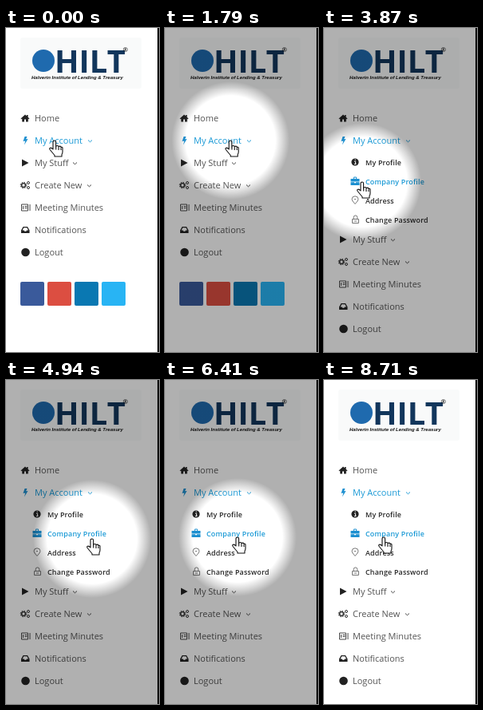
Animation of 192 by 406 pixels, one loop 9620 ms. Source, as an HTML page:

```html
<!DOCTYPE html>
<html lang="en">
<head>
<meta charset="utf-8">
<title>Account menu</title>
<style>
  html, body { margin: 0; width: 100%; height: 100%; overflow: hidden; background: #fff; }
  svg { display: block; width: 192px; height: 406px; }
  text { font-family: "Open Sans", sans-serif; fill: currentColor; }
  .item { font-size: 11px; color: #555; --ink: #222; }
  .sub { font-size: 9px; font-weight: 600; letter-spacing: .15px; color: #2a2a2a; --ink: #222; --edge: #777; }
  .active { color: #1b9ad6; --ink: #1b8fd0; --edge: #1b9ad6; }
  .brand { font-size: 40px; font-weight: 700; color: #12365c; }
  .tagline { font: italic bold 6.05px "Liberation Sans", Arial, sans-serif; color: #111; }
  .solid { fill: var(--ink); }
  .line { fill: none; stroke: var(--edge, #444); }
</style>
</head>
<body>
<svg viewBox="0 0 192 406">
  <defs>
    <radialGradient id="light" gradientUnits="userSpaceOnUse" cx="0" cy="0" r="74">
      <stop offset=".76" stop-opacity="0"/>
      <stop offset=".88" stop-opacity=".15"/>
      <stop offset="1" stop-opacity=".31"/>
    </radialGradient>
    <clipPath id="fold"><rect id="foldBox" y="156" width="190" height="0"/></clipPath>

    <path id="chevron" class="line" d="M-2.5-1L0 1.3 2.5-1"/>
    <path id="home" class="solid" d="M-5.5.5L0-4.5 2-2.8V-4h1.6v2.7L5.5.5l-.8.8-.9-.8v4H1v-3h-2v3h-2.8v-4l-.9.8z"/>
    <path id="bolt" class="solid" d="M-.5-5h3L1-1.7l2.500-.4L-1 5.500.2.500l-2.700.5z"/>
    <path id="play" class="solid" d="M-4-4.500L4.500 0-4 4.500z"/>
    <g id="gears" fill="none" stroke="#333">
      <circle cx="-2" r="2.500" stroke-width="1.700"/>
      <circle cx="-2" r="3.800" stroke-dasharray="1.5"/>
      <circle cx="4" cy="-3" r="1.500"/>
      <circle cx="4" cy="3" r="1.500"/>
    </g>
    <path id="paper" class="line" d="M-4.500-4h8v8h-8zM6-4v8M-2.500-2v4M-.5-1.500h3M-.5.5h3"/>
    <path id="tray" class="solid" d="M-2.500-4H3L5.500.5V4H-5V.5zM-1.700-2.700L-3.400.5h2l.7 1.200h2L2 .5h2L2.300-2.700z"/>
    <circle id="dot" cx=".5" r="5.300" class="solid"/>
    <g id="info">
      <circle r="4.600" class="solid"/>
      <path d="M-1-.7H.6v3M-1.200 2.500h2.700M-.4-2.800H.9" fill="none" stroke="#fff"/>
    </g>
    <path id="case" class="solid" d="M-5.500-3h3.500v-1.500q0-1 1-1h2q1 0 1 1V-3h3.500V.5h-11zM-1-4.500V-3h2v-1.500zM-5.500 1.200h4.500v1h2v-1h4.500V5h-11z"/>
    <path id="pin" class="line" d="M0 4.500Q-4 .5-4-1.500a4 3.700 0 0 1 8 0Q4 .5 0 4.500zM-1-1.500h2"/>
    <path id="lock" class="line" d="M-3.500-.5h8v5h-8zM-1.800-.5v-2.300a2.300 2.300 0 0 1 4.600 0v2.300M-1 2h3"/>
  </defs>

  <rect width="192" height="406" fill="#fff"/>
  <rect x="18" y="12" width="152" height="64" rx="3" fill="#f9fafa"/>
  <circle cx="47" cy="41" r="14" fill="#1f6aae"/>
  <text class="brand" x="61" y="56">HILT</text>
  <text x="146.5" y="30" font-size="8">®</text>
  <text class="tagline" x="32" y="64">Halverin Institute of Lending &amp; Treasury</text>

  <g id="upper"></g>
  <g id="submenu" clip-path="url(#fold)"></g>
  <g id="lower"></g>

  <rect id="shade" width="190" height="406" fill="url(#light)"/>
  <rect x="190" width="2" height="406" fill="#111"/>

  <g id="hand" fill="#fff" stroke="#111" stroke-width="1.1" stroke-linejoin="round">
    <path d="M-2 11V1.800a1.800 1.800 0 0 1 3.600 0V8q0-1.500 1.800-1.500T5 8.300q0-1.200 1.600-1.200T8 9q0-.8 1.100-.8T10 10v4q0 2-1 3.500V20H0V18.500Q-3 15-5.800 11.500q-1.200-1.800.3-2.300T-2 11Z"/>
    <path d="M1.700 8v3.500M5 8.500V12M8 9.500V12" fill="none"/>
  </g>
</svg>

<script>
const LOOP = 9620;
const TICK = 134.6;   // the picture refreshes once per tick
const LEAD = 57;      // the first tick of a loop is shorter
const SUB_HEIGHT = 96;
const $ = id => document.getElementById(id);

function add(parent, tag, attrs, text = '') {
  const el = document.createElementNS('http://www.w3.org/2000/svg', tag);
  for (const name in attrs) el.setAttribute(name, attrs[name]);
  el.textContent = text;
  return parent.appendChild(el);
}

function addRow(parent, kind, icon, label, iconX, textX, y) {
  const row = add(parent, 'g', { class: kind });
  add(row, 'use', { href: '#' + icon, x: iconX, y });
  add(row, 'text', { x: textX, y: y + (kind === 'sub' ? 3.5 : 4) }, label);
  return row;
}

const menu = [
  ['home', 'Home'], ['bolt', 'My Account', 105.5], ['play', 'My Stuff', 86.5],
  ['gears', 'Create New', 104.5], ['paper', 'Meeting Minutes'],
  ['tray', 'Notifications'], ['dot', 'Logout']
];
menu.forEach(([icon, label, arrowX], i) => {
  const y = 113 + 28 * i;
  const row = addRow($(i < 2 ? 'upper' : 'lower'), 'item', icon, label, 24, 36, y);
  if (arrowX) add(row, 'use', { href: '#chevron', x: arrowX, y: y + .5 });
  row.classList.toggle('active', label === 'My Account');
});

const submenu = [
  ['info', 'My Profile'], ['case', 'Company Profile'],
  ['pin', 'Address'], ['lock', 'Change Password']
];
const subRows = submenu.map(([icon, label], i) =>
  addRow($('submenu'), 'sub', icon, label, 39, 52, 168 + 24 * i));

['#3a5a9b', '#dc4e41', '#0a78b2', '#28b4f4'].forEach((fill, i) =>
  add($('lower'), 'rect', { x: 18 + 34 * i, y: 318, width: 30, height: 30, rx: 2, fill }));

// Turning points of the pointer tip: tick, x, y
const stops = [
  [0, 61, 141], [5, 61, 141], [6, 32, 142], [7, 32, 142], [11, 84, 139], [17, 77, 147],
  [21, 77, 147], [25, 97, 177], [29, 48, 193], [37, 108, 199], [42, 58, 194],
  [46, 105, 197], [48, 91, 197], [52, 66, 195], [56, 75, 197]
];

const progress = (t, from, to) => Math.min(1, Math.max(0, (t - from) / (to - from)));
const ease = u => (1 - Math.cos(Math.PI * u)) / 2;

function pointerAt(tick) {
  const next = stops.findIndex(s => s[0] > tick);
  if (next < 0) return stops.at(-1).slice(1);
  const [from, x0, y0] = stops[next - 1];
  const [to, x1, y1] = stops[next];
  const u = ease(progress(tick, from, to));
  return [x0 + (x1 - x0) * u, y0 + (y1 - y0) * u];
}

function draw(ms) {
  const tick = Math.floor((ms % LOOP + LEAD) / TICK);
  const [x, y] = pointerAt(tick);
  const open = SUB_HEIGHT * ease(progress(tick, 18, 21));
  const dim = progress(tick, 0, 1) - progress(tick, 63, 65);

  $('hand').setAttribute('transform', `translate(${x} ${y})`);
  $('light').setAttribute('gradientTransform', `translate(${x} ${y})`);
  $('shade').setAttribute('opacity', dim);
  $('foldBox').setAttribute('height', open);
  $('lower').setAttribute('transform', `translate(0 ${open})`);

  const hovered = Math.floor((y - 156) / 24);
  subRows.forEach((row, i) => row.classList.toggle('active', i === hovered));
}

let start;
function frame(now) {
  start ??= now;
  draw(now - start);
  requestAnimationFrame(frame);
}
draw(0);
requestAnimationFrame(frame);
</script>
</body>
</html>
```
